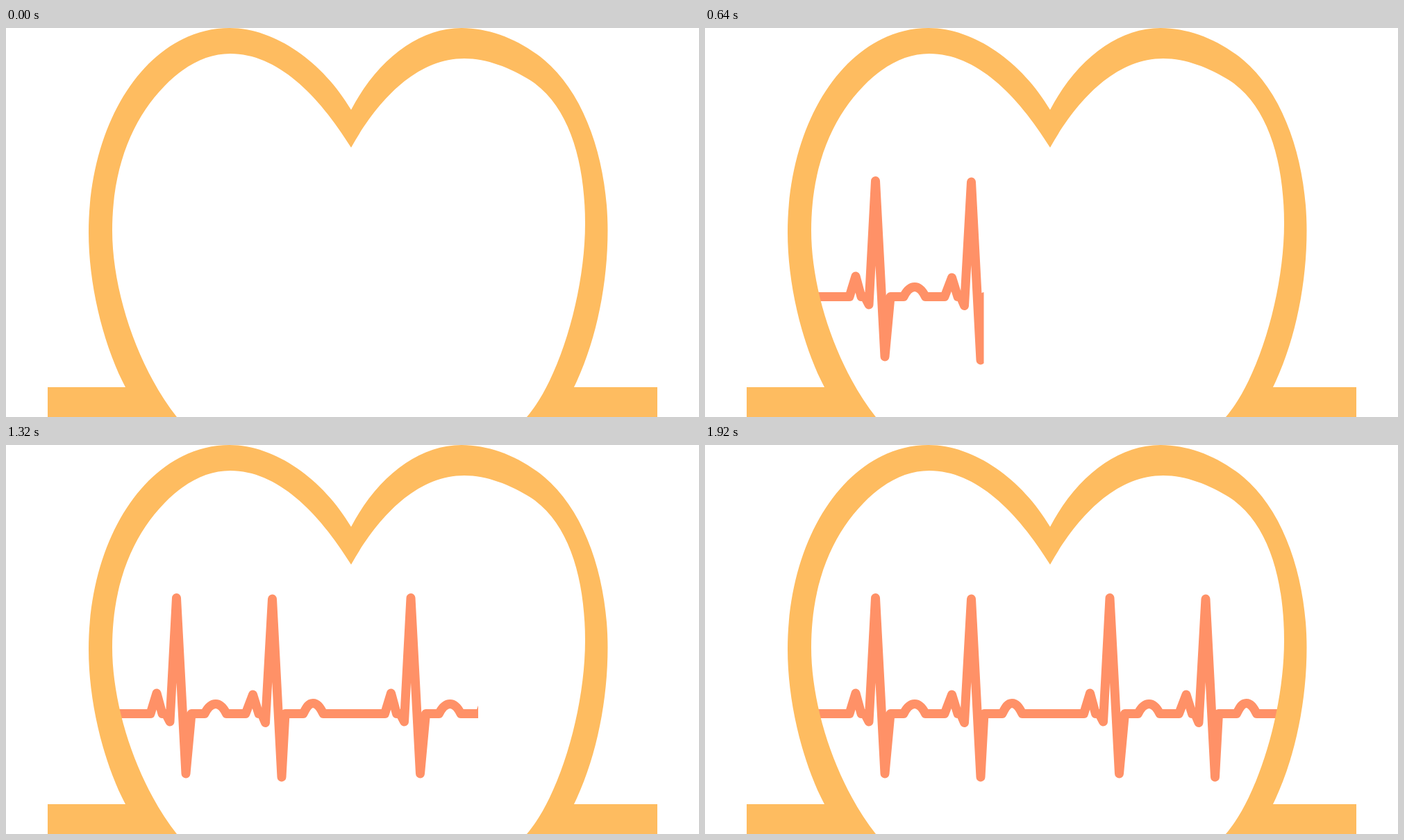
Recreate the animation shown at these times as an HTML page. Size 998x561 px, loop 2000 ms.

```html
<!DOCTYPE html>
<html lang="en">
<head>
<meta charset="utf-8">
<title>Heartbeat</title>
<style>
  html, body { margin: 0; width: 100%; height: 100%; overflow: hidden; background: #fff; }
  svg { display: block; width: 100vw; height: 100vh; }
</style>
</head>
<body>
<svg viewBox="0 0 998 561">
  <clipPath id="reveal"><rect id="window" width="0" height="561"/></clipPath>
  <g clip-path="url(#reveal)">
    <path id="trace" fill="none" stroke="#ff9167" stroke-width="13" stroke-linecap="round" stroke-linejoin="round"/>
  </g>
  <path fill="#febc60" d="
    M60 561 V518 H172
    C140 457 119 370 119 295
    C119 130 207 0 322 0
    C388 0 457 50 497 118
    C535 45 595 0 656 0
    C697 0 740 17 775 46
    C835 96 866.5 195 866.5 292
    C866.5 370 850 452 818 518
    H938 V561 H750
    C798 505 834 380 834 282
    C834 195 812 113 756 76
    C726 57 692 44 660 44
    C590 44 535 105 497 172.5
    C449 95 390 37 323 37
    C290 37 258 53 228 84
    C183 130 153 200 153 292
    C153 380 190 490 246 561 Z"/>
</svg>
<script>
  const LOOP = 2000, STEP = 40, LAST = 1920;
  const BASE = 387.5;
  const START_X = 139.5, SPEED = 0.4094; // px, px per ms
  const PAIR_GAP = 337.5;

  const beats = [
    { spikes: [[208, BASE], [217, 358], [225, BASE], [230, BASE], [236, 399],
               [245.5, 220.5], [259, 474], [267, BASE]],
      hump: [286, 302, 317.5, 373.5] },
    { spikes: [[345, BASE], [355.5, 360], [364, BASE], [368, BASE], [373.5, 400.5],
               [383.5, 222], [397, 479], [402, BASE]],
      hump: [428, 442, 457, 372.5] }
  ];

  function beatPath({ spikes, hump: [left, mid, right, top] }, dx) {
    const lines = spikes.map(([x, y]) => `L${x + dx} ${y}`).join("");
    const rise = `C${left + 5 + dx} ${BASE - 10} ${mid - 6 + dx} ${top} ${mid + dx} ${top}`;
    const fall = `S${right - 5 + dx} ${BASE - 10} ${right + dx} ${BASE}`;
    return `${lines}L${left + dx} ${BASE}${rise}${fall}`;
  }

  const wave = [0, PAIR_GAP].flatMap(dx => beats.map(beat => beatPath(beat, dx))).join("");
  document.getElementById("trace").setAttribute("d", `M150 ${BASE}${wave}L835 ${BASE}`);

  const revealRect = document.getElementById("window");
  const origin = performance.now();

  function draw() {
    const time = (performance.now() - origin) % LOOP;
    const tick = Math.min(LAST, Math.floor(time / STEP) * STEP);
    revealRect.setAttribute("width", START_X + tick * SPEED);
    requestAnimationFrame(draw);
  }
  draw();
</script>
</body>
</html>
```
